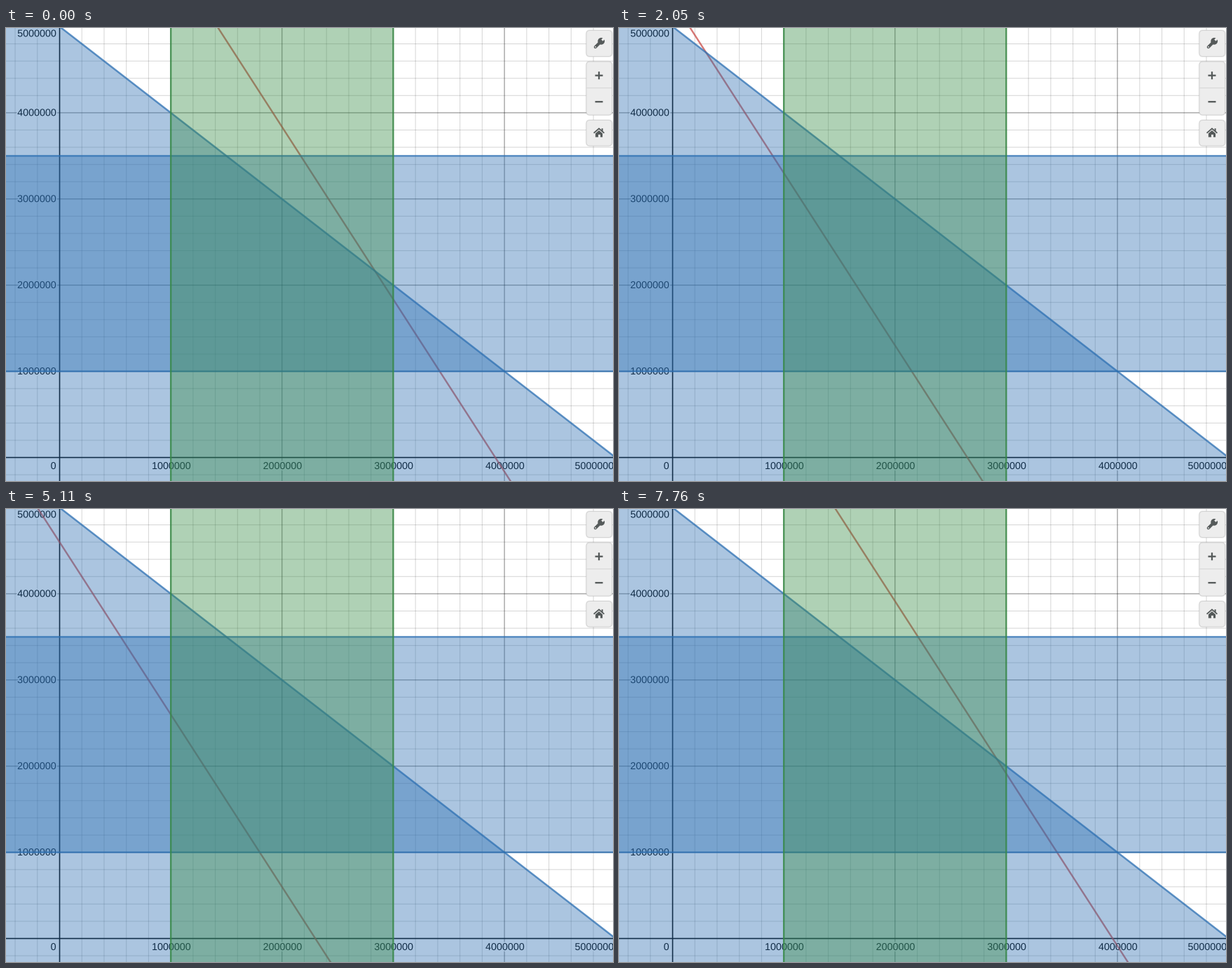
A matplotlib script that plays this animation: 866x646 px, repeating every 7.82 s.

```python
import numpy as np
import matplotlib.pyplot as plt
from matplotlib.animation import FuncAnimation
from matplotlib.collections import LineCollection
from matplotlib.patches import Circle, FancyBboxPatch, Polygon
from matplotlib.patheffects import withStroke

W, H, DPI = 866, 646, 100
LOOP, TICK, HOLD = 7820, 20, 77.6
X0, Y0, SX, SY = 76.5, 612.5, 158.65, 122.9   # origin and pixels per million
PT = 72 / DPI
BLUE, GREEN, RED = "#2d70b3", "#388c46", "#c74440"
PANEL, ICON = "#ededed", "#555a5a"

fig = plt.figure(figsize=(W / DPI, H / DPI), dpi=DPI, facecolor="white")
ax = fig.add_axes([0, 0, 1, 1])
ax.set_xlim(0, W)
ax.set_ylim(H, 0)
ax.axis("off")


def px(x):
    return X0 + SX * x


def py(y):
    return Y0 - SY * y


def line(xs, ys, color, lw, z, alpha=1.0, cap="butt"):
    art, = ax.plot(xs, ys, color=color, lw=lw * PT, alpha=alpha, zorder=z,
                   solid_capstyle=cap, solid_joinstyle="miter", snap=False)
    return art


def poly(pts, color, z, alpha=1.0):
    ax.add_patch(Polygon(pts, closed=True, fc=color, ec="none", lw=0,
                         alpha=alpha, zorder=z))


def dot(x, y, r, color, z):
    ax.add_patch(Circle((x, y), r, fc=color, ec="none", zorder=z))


def grid(ticks, alpha):
    segs = [[(px(v), 0), (px(v), H)] for v in ticks]
    segs += [[(0, py(v)), (W, py(v))] for v in ticks]
    lines = LineCollection(segs, colors="black", alpha=alpha,
                           linewidths=1.1 * PT, zorder=1)
    lines.set_snap(False)
    ax.add_collection(lines)


def label(x, y, text, ha):
    ax.text(x, y + 5, text, ha=ha, va="baseline", family="Liberation Sans",
            size=14.3 * PT, color="black", zorder=3,
            path_effects=[withStroke(linewidth=3.4 * PT, foreground="white")])


def panel(y, h):
    for grow, color, alpha in ((1.2, "black", 0.07), (0, PANEL, 1)):
        ax.add_patch(FancyBboxPatch(
            (828 - grow, y - grow), 36.5 + 2 * grow, h + 2 * grow,
            boxstyle=f"round,pad=0,rounding_size={5 + grow}",
            fc=color, ec="#d2d2d2" if grow == 0 else "none",
            lw=0.9 * PT, alpha=alpha, zorder=20))


# Grid, axes and labels lie beneath the shaded regions
grid([i / 5 for i in range(-5, 30) if i % 5], 0.15)
grid(range(1, 6), 0.45)
line([X0, X0], [0, H], "black", 1.6, 2)
line([0, W], [Y0, Y0], "black", 1.6, 2)
label(71.5, 624, "0", "right")
for m in range(1, 6):
    name = f"{m}000000"
    label(71.3, max(py(m), 8) - 0.6, name, "right")
    if m < 5:
        label(px(m) + 0.5, 624, name, "center")
label(811.5, 624, "5000000", "left")

# Moving line 2x + y = c
mover = line([0, 0], [0, H], RED, 2.4, 4, 0.72)

# x + y <= 5
poly([(px(-1), py(6)), (px(6), py(-1)), (px(-1), py(-1))], BLUE, 5, 0.4)
line([px(-1), px(6)], [py(6), py(-1)], BLUE, 2.5, 6, 0.75)

# 1 <= y <= 3.5
lo, hi = py(1), py(3.5)
poly([(0, hi), (W, hi), (W, lo), (0, lo)], BLUE, 7, 0.4)
for y in (lo, hi):
    line([0, W], [y, y], BLUE, 2.4, 8, 0.75)

# 1 <= x <= 3
lo, hi = px(1), px(3)
poly([(lo, 0), (hi, 0), (hi, H), (lo, H)], GREEN, 9, 0.4)
for x in (lo, hi):
    line([x, x], [0, H], GREEN, 2.4, 10, 0.8)

# Toolbar
panel(3.5, 37)
panel(48, 76)
panel(131.5, 36.5)
line([828, 864.5], [85.5, 85.5], "#d6d6d6", 1, 21)

# Wrench
line([840.8, 848], [27.2, 20], ICON, 4.2, 22, cap="round")
dot(849.2, 18.8, 4.9, ICON, 22)
line([850.4, 856.5], [17.6, 11.5], PANEL, 3.2, 23)
dot(841, 27, 0.9, PANEL, 23)

# Plus and minus
for y in (67.7, 105.2):
    line([840.5, 851.5], [y, y], ICON, 2.3, 22)
line([846, 846], [62.2, 73.2], ICON, 2.3, 22)

# Home
line([838.6, 846, 853.4], [149.8, 143.4, 149.8], ICON, 1.8, 22)
poly([(849.6, 143.2), (851.6, 143.2), (851.6, 148), (849.6, 146.2)], ICON, 22)
poly([(840.9, 150.4), (846, 146), (851.1, 150.4), (851.1, 155.6),
      (840.9, 155.6)], ICON, 22)
poly([(844.5, 151.8), (847.5, 151.8), (847.5, 155.6), (844.5, 155.6)],
     PANEL, 23)


def draw(n):
    k = round(n * TICK / HOLD)       # the slider advances in equal steps
    c = 3 + 0.0975 * abs(k - 49.6)   # and bounces at c = 3
    ys = np.array([6.0, -1.0])
    mover.set_data(px((c - ys) / 2), py(ys))
    return [mover]


anim = FuncAnimation(fig, draw, frames=LOOP // TICK, interval=TICK,
                     init_func=lambda: draw(0), repeat=True, repeat_delay=0,
                     blit=False)
plt.show()
```
